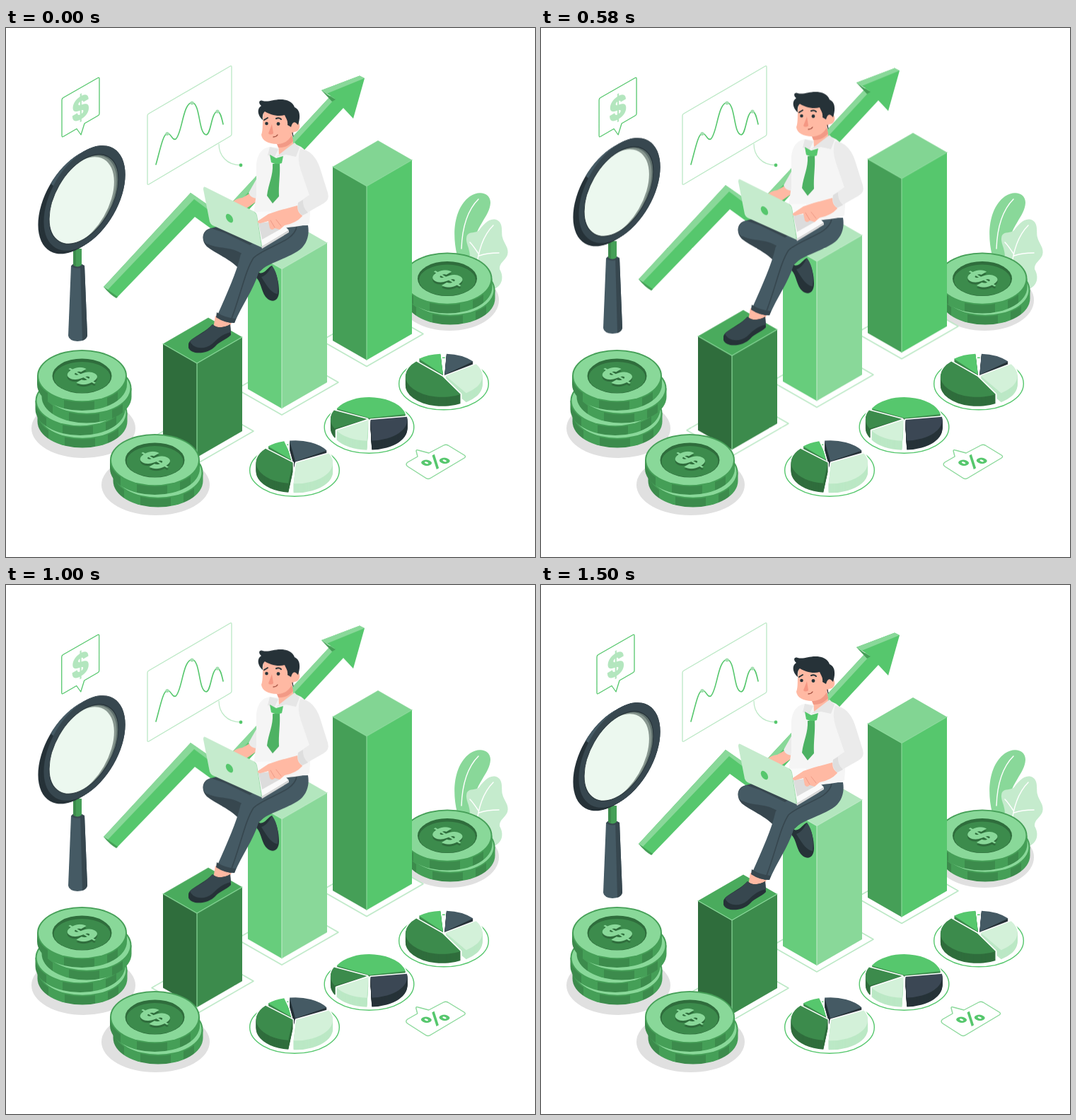
These frames come from a looping animation (748x748 px, 1.54 s). An HTML page:

```html
<!DOCTYPE html>
<html lang="en">
<head>
<meta charset="utf-8">
<title>Growth</title>
<style>
html, body { margin: 0; width: 100%; height: 100%; overflow: hidden; background: #fff; }
svg { display: block; width: 100vw; height: 100vh; }
text { font-family: Inter, sans-serif; font-weight: 900; text-anchor: middle; }
.float { animation: float 1540ms linear infinite; }
.shake { animation: shake 1540ms linear infinite; }
@keyframes float {
  0%, 97.4%, 100% { transform: translateY(0); }
  1.3% { transform: translateY(.4px); }
  50% { transform: translateY(-14.5px); }
}
@keyframes shake {
  0%, 97.4%, 100% { transform: translateX(0); }
  11.04%, 88.96% { transform: translateX(-1.3px); }
  20.78%, 79.22% { transform: translateX(3.2px); }
  30.52%, 50%, 69.48% { transform: translateX(-5.8px); }
  40.26%, 59.74% { transform: translateX(6.2px); }
}
</style>
</head>
<body>
<svg viewBox="0 0 748 748" fill="none" stroke-linecap="round" stroke-linejoin="round">
  <defs>
    <linearGradient id="edge">
      <stop offset=".12" stop-color="#3c8b4c"/><stop offset=".12" stop-color="#459f57"/>
      <stop offset=".3" stop-color="#459f57"/><stop offset=".3" stop-color="#3c8b4c"/>
      <stop offset=".64" stop-color="#3c8b4c"/><stop offset=".64" stop-color="#459f57"/>
      <stop offset=".78" stop-color="#459f57"/><stop offset=".78" stop-color="#3c8b4c"/>
      <stop offset=".9" stop-color="#3c8b4c"/><stop offset=".9" stop-color="#459f57"/>
    </linearGradient>
    <clipPath id="hole"><circle r="56.5" transform="matrix(.866 -.5 0 1 110 242)"/></clipPath>
    <clipPath id="lit"><path d="M40 204L75 228L140 190L124 158H40Z"/></clipPath>
  </defs>

  <g id="panel">
    <path d="M202 121L317 54Q319 53 319 55V150Q319 152 317 153L202 221Q200 222 200 220V124Q200 122 202 121Z" stroke="#bbe8c5" stroke-width="1.3"/>
    <path d="M301 164C301 180 312 194 332 194" stroke="#bbe8c5" stroke-width="1.2"/>
    <circle cx="332" cy="194" r="2.4" fill="#56c76d"/>
    <path d="M212 193C218 172 222 150 228 149C234 149 235 160 240 157C249 150 250 106 263 105.500C275 106 272 150 283 151C290 151 290 119 299 118C303 118 305 127 307 136" stroke="#56c76d" stroke-width="1.6"/>
    <g fill="#a5e0b2"><circle cx="228" cy="149.500" r="2.6"/><circle cx="263" cy="106" r="2.6"/><circle cx="299" cy="118" r="2.6"/></g>
  </g>

  <g class="shake">
    <path d="M81 98.500L130 70.500Q132 69.500 132 72V121Q132 123 130 124L111 135L106 151L100 142.500L81 153.500Q79 154.500 79 152V102Q79 99.500 81 98.500Z" stroke="#56c76d" stroke-width="1.3"/>
    <text transform="matrix(.866 -.5 0 1 105.5 113)" y="16" font-size="44" fill="#b3e6be">$</text>
  </g>

  <g id="leaves">
    <path d="M638 322C630 290 634 254 656 238C669 229 685 233 685 247C684 268 664 276 656 322Z" fill="#89d899"/>
    <path d="M644 312C645 284 652 258 668 242" stroke="#fff" stroke-width="1.4"/>
    <path d="M656 326C657 311 648 303 652 293C656 287 664 291 669 286C674 279 683 268 693 271C704 275 700 288 702 296C704 305 712 311 709 321C706 329 697 332 698 341C704 351 703 365 688 370Z" fill="#c5ebcd"/>
    <path d="M665 344C667 316 675 293 689 279M669 322C680 318 688 318 697 318M668 319C664 313 660 307 656 303" stroke="#fff" stroke-width="1.4"/>
  </g>
  <g id="back"></g>

  <g class="float">
    <g id="arrow">
      <path d="M138 366L261 233L304 263L459 96L446 88L500 67.500L507 71L491 128L477 113L307 296L267 267L157 381Z" fill="#56c76d"/>
      <path d="M138 366L261 233L304 263L459 96L465 100L306 272L266 242L144 370ZM446 88L500 67.500L507 71L453 93Z" fill="#89d899"/>
      <path d="M138 366L144 370L158 380L156 382Q147 377 138 366ZM446 88L453 93L466 101L461 104Z" fill="#459f57"/>
    </g>
    <g id="bars"></g>

    <g id="man">
      <!-- legs and shoes -->
      <path d="M357 345C364 351 371 337 376 336C383 347 386 360 386 372C386 385 378 389 370 383C361 376 362 361 354 353Z" fill="#263238"/>
      <path d="M361 352C368 350 373 342 376 336C385 347 386 366 384 376C377 376 370 367 361 352Z" fill="#37474f"/>
      <path d="M290 283C277 285 275 300 284 309C298 320 318 327 330 341L348 354L370 334L352 298L318 276Z" fill="#37474f"/>
      <path d="M296 407L293 425L312 432L321 412Z" fill="#ffb9a3"/>
      <path d="M258 447C260 438 277 434 292 419C298 425 309 424 317 419L318 434C311 441 302 443 296 450C286 461 262 463 258 452Z" fill="#263238"/>
      <path d="M260 443C266 436 280 433 292 419C298 425 309 424 317 419L318 430C303 434 299 440 291 447C281 455 265 454 260 443Z" fill="#37474f"/>
      <path d="M290 283C276 288 275 303 288 307C304 312 322 310 332 319C327 343 314 372 298 408Q308 417 323 417C334 391 350 370 357 346C367 333 399 326 416 313C427 304 429 290 427 279L384 280L345 307L310 290Z" fill="#455a64"/>
      <path d="M411 281C407 303 368 308 350 325C338 343 332 378 317 416M285 306C300 315 320 311 332 319" stroke="#37474f" stroke-width="1.6"/>
      <path d="M298 402Q310 410 325 411L323 417Q309 417 297 409Z" fill="#37474f"/>

      <!-- far arm -->
      <path d="M355 228L334 240Q325 241 319 247L337 257L356 244Z" fill="#ffb9a3"/>
      <path d="M355 212L343 233Q346 241 356 241Z" fill="#ebebeb"/>

      <!-- torso -->
      <path d="M373 168C359 170 353 183 354 202L354 235L350 262L378 284C398 282 418 281 429 276L431 248L429 181Q422 169 411 165L385 169Z" fill="#f5f5f5"/>
      <path d="M385 157L386 179L407 169L404 148Z" fill="#ffb9a3"/>
      <path d="M383 164Q398 164 404 151L406 160Q397 170 385 169Z" fill="#f29a86"/>
      <path d="M385 171L373 168L370 180L380 182ZM382 182L408 162L415 169L410 182L396 179Z" fill="#e6e6e6"/>
      <path d="M373 179L382 184L392 181L390 191L383 193L375 190Z" fill="#56c76d"/>
      <path d="M377 192L387 192C388 208 385 221 386 238L377 248L369 237C371 220 378 209 377 192Z" fill="#4db263"/>

      <!-- head -->
      <path d="M364 119C362 134 364 143 361 151C362 159 371 164 383 164C397 163 404 152 407 147C417 147 418 133 410 131L407 115Q386 109 364 119Z" fill="#ffb9a3"/>
      <path d="M363 130C356 124 354 114 361 110C356 106 358 101 363 103C371 105 378 101 388 101C400 101 406 106 408 112C417 116 416 127 413 137Q406 128 403 140L398 137C399 131 396 128 394 123C384 126 373 122 366 118Q362 121 363 130Z" fill="#263238"/>
      <path d="M376 136L371 149Q374 152 378 149Z" fill="#f28f7a" opacity=".8"/>
      <path d="M365 130L370 127M382 128Q386 126 389 129" stroke="#263238" stroke-width="2"/>
      <circle cx="368.500" cy="135" r="2.3" fill="#263238"/><circle cx="385" cy="135.500" r="2.4" fill="#263238"/>
      <path d="M378 154Q382 154 384 151" stroke="#a24e3f" stroke-width="1.3"/>
      <path d="M405 148L406 153" stroke="#263238" stroke-width="1.2"/>

      <!-- laptop -->
      <path d="M350 260L374 259L400 286L361 310Z" fill="#fafafa"/>
      <path d="M400 286V289L362 312L361 309Z" fill="#d6d6d6"/>
      <path d="M357 276L381 273L387 285L362 299Z" fill="#dcdcdc"/>
      <path d="M282 225L350 259Q353 261 354 264L361 310L292 279Q289 277 288 274L279 228Q279 223 282 225Z" fill="#c5ebcd"/>
      <path d="M350 259Q354 261 355 265L362 308L361 310L354 264Z" fill="#9fdcac"/>
      <circle r="5.6" transform="matrix(.92 .5 0 1 316 269)" fill="#56c76d"/>

      <!-- near arm -->
      <path d="M412 251L386 258L371 263L356 273Q355 276 360 276L371 273L373 283Q376 287 380 283L387 285L394 279Q410 276 419 266Z" fill="#ffb9a3"/>
      <path d="M374 272L380 282M382 271L389 280" stroke="#f09a86" stroke-width="1"/>
      <path d="M416 171C430 172 439 183 444 198L455 233Q458 243 449 248L419 265Q410 260 413 247L429 236L417 201Q411 183 416 171Z" fill="#ebebeb"/>
      <path d="M413 247L420 243Q419 254 427 261L419 265Q411 259 413 247Z" fill="#dedede"/>
    </g>
  </g>

  <g class="float" id="lens">
    <path d="M92 336Q101 330 111 336L115 435Q114 442 101 443Q89 442 88 435Z" fill="#455a64"/>
    <path d="M105 333L111 336L115 435Q114 440 108 442Z" fill="#37474f"/>
    <ellipse cx="101" cy="336" rx="8" ry="3.500" fill="#37474f"/>
    <path d="M95 312H107V335Q101 340 95 335Z" fill="#459f57"/>
    <path d="M95 312H99V337L95 335Z" fill="#3c8b4c"/>
    <g id="rim" fill="#263238"></g>
    <g id="shine" fill="#455a64" clip-path="url(#lit)"></g>
    <circle r="66.500" transform="matrix(.866 -.5 0 1 111 240.5)" fill="#37474f"/>
    <g clip-path="url(#hole)">
      <path d="M50 170H170V320H50Z" fill="#5f706d"/>
      <circle r="57" transform="matrix(.866 -.5 0 1 107 244)" fill="#87968f"/>
      <circle r="57" transform="matrix(.866 -.5 0 1 103.5 246)" fill="#ecf8ef"/>
    </g>
    <circle r="56.500" transform="matrix(.866 -.5 0 1 110 242)" stroke="#263238"/>
  </g>

  <g id="front"></g>

  <g class="shake">
    <path d="M568 614L582 606L580 598Q580 596 583 597L598 601L619 590Q622 588.500 625 590L648 604Q651 606 648 608L601 636Q597 639 593 636L568 620Q564 617 568 614Z" stroke="#89d899" stroke-width="1.4"/>
    <text transform="matrix(.866 -.5 .866 .5 607.5 613.5)" y="11.500" font-size="32" fill="#56c76d">%</text>
  </g>
</svg>
<script>
const put = (id, html) => { document.getElementById(id).innerHTML += html; };
const poly = (pts, fill) => `<path d="M${pts.join('L')}Z" fill="${fill}"/>`;
const oval = (x, y, rx, ry, fill) => `<ellipse cx="${x}" cy="${y}" rx="${rx}" ry="${ry}" fill="${fill}"/>`;

// Isometric bar: x and y are the left corner of its top
function bar(x, y, h, left, right, top, line) {
  const w = [x, y], n = [x + 64, y - 37], e = [x + 112, y - 9.5], s = [x + 48, y + 27.5];
  const drop = ([a, b], dx = 0, dy = 0) => [a + dx, b + h + dy];
  const base = [drop(w, -16), drop(n, 0, -9), drop(e, 16), drop(s, 0, 9)];
  return `<path d="M${base.join('L')}Z" stroke="#bbe8c5" stroke-width="1.5"/>` +
    poly([w, s, drop(s), drop(w)], left) + poly([s, e, drop(e), drop(s)], right) +
    poly([w, n, e, s], top) +
    `<path d="M${w}L${s}L${e}M${s}L${drop(s)}" stroke="${line}" stroke-width="1.2"/>`;
}

function coin(x, y, h = 12) {
  return `<path d="M${x - 63.5} ${y}v${h}a63.5 37 0 0 0 127 0v${-h}Z" fill="url(#edge)"/>` +
    oval(x, y, 63.5, 37, '#459f57') + oval(x, y, 61.5, 35.2, '#89d899');
}

function face(x, y) {
  const sign = (dy, fill) => `<text transform="matrix(.866 -.5 .866 .5 ${x} ${y + dy})" y="16.500" font-size="46" fill="${fill}">$</text>`;
  return oval(x, y, 42, 24.5, '#2f6d3c') + oval(x, y + 2, 40, 22, '#3c8b4c') +
    sign(3, '#2f6d3c') + sign(0, '#89d899');
}

const stack = coins => coins.map(c => coin(...c)).join('') + face(...coins[coins.length - 1]);

const tones = {
  navy: ['#455a64', '#263238'],
  ink: ['#3b4754', '#263238'],
  deep: ['#3c8b4c', '#2f6d3c'],
  mid: ['#56c76d', '#3c8b4c'],
  pale: ['#d3f1d9', '#bbe8c5']
};

// Slices are [tone, start, end] in degrees, listed back to front
function pie(x, y, slices) {
  let out = `<ellipse cx="${x}" cy="${y + 11.5}" rx="63.3" ry="36.8" stroke="#56c76d" stroke-width="1.4"/>`;
  for (const [tone, from, to] of slices) {
    const at = (deg, r = 1) => [52 * r * Math.cos(deg * Math.PI / 180), 29.5 * r * Math.sin(deg * Math.PI / 180)];
    const [dx, dy] = at((from + to) / 2, .05);
    const [a, b] = [at(from), at(to)].map(p => p.map(v => v.toFixed(1)));
    const d = `M0 0L${a}A52 29.5 0 ${to - from > 180 ? 1 : 0} 1 ${b}Z`;
    const [top, side] = tones[tone];
    const layer = (k, paint) => `<path d="${d}" transform="translate(${x + dx} ${y + dy + k})" ${paint}/>`;
    // White halo keeps the gaps between slices clear
    for (let k = 13; k >= 0; k--) out += layer(k, 'stroke="#fff" stroke-width="3"');
    for (let k = 13; k >= 0; k--) out += layer(k, `fill="${k ? side : top}"`);
  }
  return out;
}

put('back', oval(627, 385, 70, 43, '#e0e0e0') + stack([[628, 370.5], [624, 354.5]]));

put('bars',
  bar(462, 196, 246, '#459f57', '#56c76d', '#82d593', '#89d899') +
  bar(342, 313, 197.5, '#67cd7c', '#89d899', '#b3e6be', '#b9e8c3') +
  bar(222, 446.5, 133, '#2f6d3c', '#3c8b4c', '#4aab5d', '#89d899'));

// Rim of the lens, swept from its back to its front
for (let k = 0; k <= 8; k++) {
  const ring = `<circle r="66.5" transform="matrix(.866 -.5 0 1 ${103 + k} ${245 - k * .56})"/>`;
  put('rim', ring);
  put('shine', ring);
}

put('front',
  oval(109.5, 566, 73.5, 42, '#e0e0e0') +
  stack([[108, 544.5], [105, 527], [114, 509.5], [107.5, 492]]) +
  oval(211.5, 646, 76.5, 43, '#e0e0e0') +
  stack([[215, 628.5], [210.5, 611]]) +
  pie(408, 614, [['mid', 226, 255], ['navy', 261, 329], ['deep', 97, 222], ['pale', -27, 94]]) +
  pie(513.5, 553, [['mid', 207, 349], ['deep', 153, 205], ['pale', 92, 150], ['ink', -8, 88]]) +
  pie(619, 491.5, [['mid', 229, 266], ['navy', 273, 321], ['pale', -34, 56], ['deep', 60, 225]]));
</script>
</body>
</html>
```
